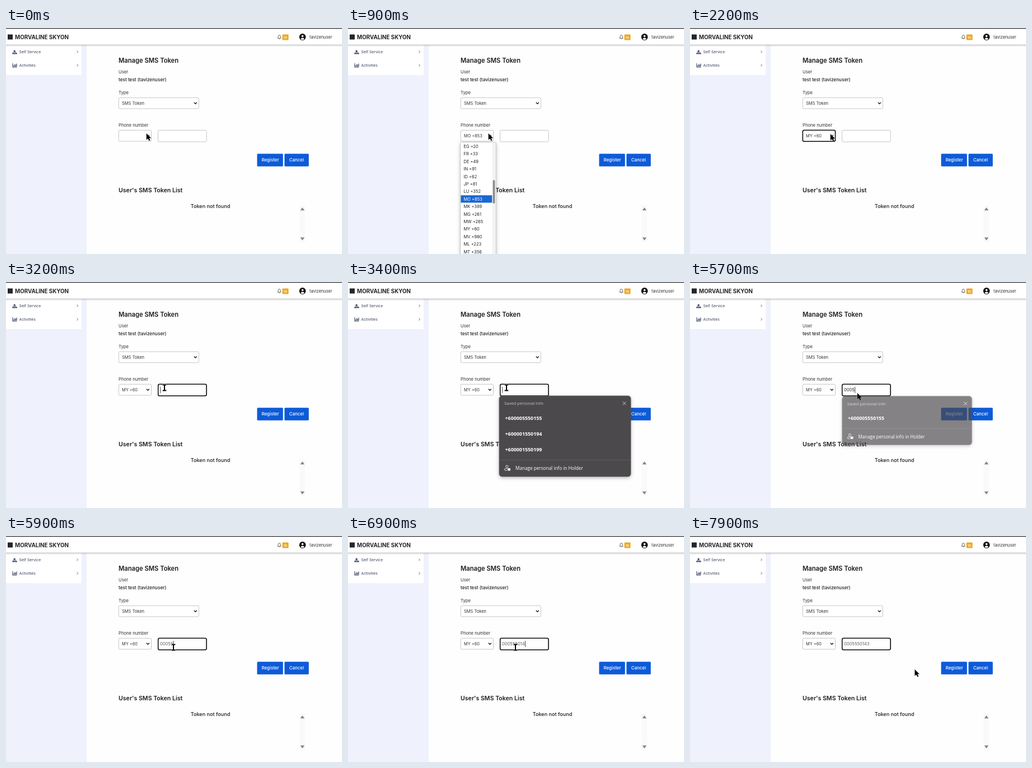
An HTML page that plays this animation: 600 px wide and 403 px high, repeating every 8000 ms.

```html
<!DOCTYPE html>
<html lang="en">
<head>
<meta charset="utf-8">
<title>Manage SMS Token</title>
<style>
  html, body { margin: 0; width: 100%; height: 100%; overflow: hidden; background: #fff; }
  svg { display: block; width: 600px; height: 403px; font: 7.5px Inter, sans-serif; fill: #333; }
  text { white-space: pre; }
  .medium { font-weight: 500; fill: #1c1c1c; }
  .heading { font-weight: 600; fill: #1c1c1c; }
  .label { font-size: 7.7px; }
  .field { fill: #fff; stroke: #c6c6c6; stroke-width: 1; }
  .focus { fill: none; stroke: #111; stroke-width: 1.6; }
  .line { fill: none; stroke: #222; stroke-width: 1.5; }
  .button { fill: #0d5bd9; }
  .on-blue { fill: #fff; font-size: 7.9px; font-weight: 500; text-anchor: middle; }
  #saved { font-family: "Open Sans", "Noto Sans", sans-serif; fill: #fff; }
  #saved .number { font-size: 8.9px; font-weight: 700; }
  #card, #listCard { filter: drop-shadow(0 2px 3px rgba(0, 0, 0, .28)); }
</style>
</head>
<body>
<svg viewBox="0 0 600 403">
  <defs>
    <linearGradient id="shade" x2="0" y2="1">
      <stop stop-color="#777" stop-opacity=".4"/>
      <stop offset="1" stop-color="#777" stop-opacity="0"/>
    </linearGradient>
    <clipPath id="listClip"><rect x="201" y="204" width="63" height="199"/></clipPath>
  </defs>

  <!-- page and sidebar -->
  <rect width="600" height="403" fill="#fefefe"/>
  <rect y="30" width="144" height="373" fill="#eff1fd"/>
  <rect y="30" width="135" height="54" fill="#fff"/>
  <g fill="#26305a">
    <path d="M13.7 40h3v2.2h-3zM11.5 44.2h2.5v2.3h-2.5zM14.6 44.2h2.3v2.3h-2.3zM17.4 44.2h2.3v2.3h-2.3zM12.6 42.8h5.2v.6h-5.2z"/>
    <path d="M11.5 63h1v6.2h7v1h-8zM13.4 66.2h1.1v2.3h-1.1zM15.2 64.6h1.1v3.9h-1.1zM17 65.6h1.1v2.9h-1.1zM18.6 63.4h1v5.1h-1z"/>
  </g>
  <g font-size="6.8" fill="#3a3f55">
    <text x="23.5" y="45.3">Self Service</text>
    <text x="23.5" y="69.3">Activities</text>
  </g>
  <path d="M126.6 40.4l1.9 2-1.9 2M126.6 64.6l1.9 2-1.9 2" fill="none" stroke="#555" stroke-width=".9"/>

  <!-- header -->
  <rect width="600" height="30" fill="#fff"/>
  <rect y="29.5" width="600" height="4" fill="url(#shade)"/>
  <rect width="600" height="1.3" fill="#35353a"/>
  <rect x="3" y="11.5" width="9" height="9" fill="#23262b"/>
  <text x="16" y="20" font-size="9.8" font-weight="700" fill="#23262b">MORVALINE SKYON</text>
  <path d="M485 18.2q1.1-.9 1.1-3.2 0-2.5 2-2.5t2 2.5q0 2.3 1.1 3.2zM487.2 19.3h1.8" fill="none" stroke="#444" stroke-width=".8"/>
  <rect x="493.5" y="11.5" width="11" height="10" rx="1.2" fill="#f2a81d"/>
  <text x="499" y="18.5" font-size="5.4" font-weight="600" text-anchor="middle" fill="#fff">10</text>
  <circle cx="529.5" cy="16" r="5.9" fill="#111"/>
  <circle cx="529.5" cy="14.4" r="1.8" fill="#fff"/>
  <path d="M526.2 19.8q.8-2.2 3.3-2.2t3.3 2.2q-3.3 2.6-6.6 0z" fill="#fff"/>
  <text x="542" y="18.5" font-size="7.4">tavizenuser</text>

  <!-- form -->
  <text class="heading" x="201" y="61.8" font-size="11.2">Manage SMS Token</text>
  <text class="label" x="201" y="81.3">User</text>
  <text class="medium" x="201" y="95.2" font-size="8.2">test test (tavizenuser)</text>
  <text class="label" x="201" y="118">Type</text>
  <rect class="field" x="201.3" y="124.3" width="143" height="19.6" rx="2"/>
  <text x="207" y="137">SMS Token</text>
  <path class="line" d="M335.8 132.8l2.5 2.5 2.5-2.5"/>
  <text class="label" x="201" y="175.5">Phone number</text>
  <rect class="field" x="201.3" y="182.3" width="58.2" height="19.7" rx="2"/>
  <text id="country" x="207" y="194.8" font-size="7.4"></text>
  <path class="line" d="M250.8 190.8l2.5 2.5 2.5-2.5"/>
  <rect class="focus" id="selectFocus" x="201.3" y="182.2" width="58.2" height="20" rx="2.5"/>
  <rect class="field" x="271.5" y="182.3" width="86.7" height="20.7" rx="2"/>
  <rect class="focus" id="inputFocus" x="271.7" y="182.3" width="86.3" height="20.7" rx="2.5"/>
  <text id="typed" x="275" y="195" font-size="7.6"></text>
  <rect id="caret" y="187" width=".9" height="11" fill="#333"/>
  <rect class="button" x="448.4" y="224.3" width="46.3" height="22.4" rx="1.5"/>
  <rect class="button" x="497.3" y="224.3" width="43.4" height="22.4" rx="1.5"/>
  <text class="on-blue" x="472" y="237.8">Register</text>
  <text class="on-blue" x="518.8" y="237.8">Cancel</text>

  <!-- token list -->
  <text class="heading" x="201" y="292.8" font-size="10.6">User's SMS Token List</text>
  <text class="medium" x="365" y="321.3" font-size="9.1" text-anchor="middle">Token not found</text>
  <rect x="524" y="316" width="10.5" height="66" fill="#fafafa"/>
  <path d="M525.5 325.3l3.8-5.3 3.8 5.3zM525.5 373.5l3.8 5.3 3.8-5.3z" fill="#858585"/>

  <!-- country list -->
  <g id="list">
    <rect id="listCard" x="201" y="204" width="63" height="220" fill="#fff" stroke="#aaa" stroke-width=".6"/>
    <g clip-path="url(#listClip)" id="rows"></g>
    <rect x="257.5" y="204.5" width="6" height="199" fill="#f3f3f3"/>
    <rect id="thumb" x="258.7" width="3.6" height="42" rx="1.8" fill="#8b8b8b"/>
  </g>

  <!-- saved numbers -->
  <g id="saved">
    <rect id="card" x="270" y="203" width="235" rx="5" fill="#4b494c" stroke="#625f63" stroke-width=".7"/>
    <text x="279" y="219.3" font-size="7.6" fill="#c4c2c5">Saved personal info</text>
    <path d="M490.6 213.3l6 6m0-6l-6 6" stroke="#ddd" stroke-width=".9"/>
    <text class="number" x="280.5" y="245.6">+600005550155</text>
    <g id="others">
      <text class="number" x="280.5" y="273.6">+600001550194</text>
      <text class="number" x="280.5" y="301.6">+600001550199</text>
    </g>
    <g id="footer">
      <path d="M270 317.3h235" stroke="#656266" stroke-width=".8"/>
      <g fill="none" stroke="#eee" stroke-width=".9">
        <circle cx="283.8" cy="329" r="2.1"/>
        <path d="M284 336h-2.5q-2 0-2-1.8 0-1.4 1.6-1.4h3.4"/>
      </g>
      <rect x="285" y="332" width="5" height="4.4" rx=".8" fill="#eee"/>
      <text x="299" y="335" font-size="8.2">Manage personal info in Holder</text>
    </g>
  </g>

  <path id="arrow" d="M-.4-.4V11.7L2.5 9.4 4.6 13.4 6.8 12.3 4.9 8.4H8.6Z" fill="#000" stroke="#fff" stroke-width=".4"/>
  <g id="beam" fill="none">
    <path d="M-3.3-5H3.3M0-5V5M-3.3 5H3.3" stroke="#fff" stroke-width="2.8"/>
    <path d="M-3.3-5H3.3M0-5V5M-3.3 5H3.3" stroke="#000" stroke-width="2"/>
  </g>
</svg>
<script>
const LOOP = 8000, ROW = 13.4, VISIBLE_ROWS = 15;
const DIGITS = "0005550143";
const COUNTRIES = (" ,AF +93,AL +355,DZ +213,AD +376,AO +244,AR +54,AM +374,AU +61,AT +43,BD +880,BE +32," +
  "BR +55,CA +1,CN +86,DK +45,EG +20,FR +33,DE +49,IN +91,ID +62,JP +81,LU +352,MO +853,MK +389," +
  "MG +261,MW +265,MY +60,MV +960,ML +223,MT +356,MQ +596,MU +230,MX +52,FM +691,MD +373,MC +377," +
  "MN +976,MA +212,MZ +258,NP +977").split(",");
const MACAU = 23, MALAYSIA = 27;

// Every row starts with its time in ms and holds until the next row.
const pointer = [
  [0, "arrow", 251, 188], [1400, "arrow", 251, 189],
  [2900, "arrow", 258, 189], [3000, "arrow", 267, 188], [3100, "beam", 283, 188.5],
  [4800, "beam", 291, 193], [4900, "beam", 299, 198.5],
  [5600, "arrow", 299, 198], [5900, "beam", 299, 198.5],
  [7600, "beam", 318, 199], [7700, "arrow", 350, 220], [7800, "arrow", 385, 236], [7900, "arrow", 401.5, 238]
];
const list = [[0, 0, 0, 0], [400, .5, 0, 0], [500, 1, 0, 0], [800, 1, MACAU, 13], [900, 1, MACAU, 16],
  [1000, 1, MALAYSIA, 16], [1100, 1, MALAYSIA, 18], [2200, 0, MALAYSIA, 18]];
const saved = [[0, 0, 1, 3], [3300, .5, .985, 3], [3400, 1, 1, 3], [5300, 1, 1, 1],
  [5600, .88, .994, 1], [5700, .68, .985, 1], [5800, .25, .975, 1], [5900, 0, 1, 1]];
const focus = [[0, ""], [2200, "select"], [3200, "input"]];
const caretOn = [[0, 0], [3200, 1], [3800, 0], [4100, 1], [7600, 0]];
const keyTimes = [4100, 4300, 4800, 5300, 5900, 6100, 6400, 6600, 6900, 7100];

const $ = id => document.getElementById(id);
const at = (steps, t) => steps.findLast(step => step[0] <= t).slice(1);
const show = (id, opacity) => $(id).style.opacity = +opacity;
const move = (id, x, y) => $(id).setAttribute("transform", `translate(${x} ${y})`);

function drawList(t) {
  const [opacity, selected, top] = at(list, t);
  show("list", opacity);
  $("country").textContent = COUNTRIES[selected];
  $("thumb").setAttribute("y", 207 + top * 4);
  $("rows").innerHTML = COUNTRIES.slice(top, top + VISIBLE_ROWS).map((name, i) => {
    const y = 204.5 + i * ROW, active = top + i === selected;
    return `<rect x="201.5" y="${y}" width="56" height="${ROW}" fill="${active ? "#1967d2" : "#fff"}"/>
      <text x="206.5" y="${y + 9.4}" fill="${active ? "#fff" : "#222"}">${name}</text>`;
  }).join("");
}

function drawSaved(t) {
  const [opacity, scale, count] = at(saved, t);
  const height = 60 + 28 * count;
  show("saved", opacity);
  show("others", count > 1);
  move("footer", 0, 28 * (count - 3));
  $("card").setAttribute("height", height);
  const cy = 203 + height / 2;
  $("saved").setAttribute("transform",
    `translate(387.5 ${cy}) scale(${scale}) translate(-387.5 ${-cy})`);
}

function drawInput(t) {
  const [target] = at(focus, t);
  show("selectFocus", target === "select");
  show("inputFocus", target === "input");
  const typed = $("typed");
  typed.textContent = DIGITS.slice(0, keyTimes.filter(time => time <= t).length);
  typed.setAttribute("fill", t >= 5300 && t < 5900 ? "#222" : "#5a5a5a");
  $("caret").setAttribute("x", 275.3 + typed.getComputedTextLength());
  show("caret", at(caretOn, t)[0]);
}

function drawPointer(t) {
  const [kind, x, y] = at(pointer, t);
  for (const id of ["arrow", "beam"]) {
    show(id, id === kind);
    move(id, x, y);
  }
}

const start = performance.now();
function frame() {
  const t = (performance.now() - start) % LOOP;
  drawList(t);
  drawSaved(t);
  drawInput(t);
  drawPointer(t);
  requestAnimationFrame(frame);
}
frame();
</script>
</body>
</html>
```
